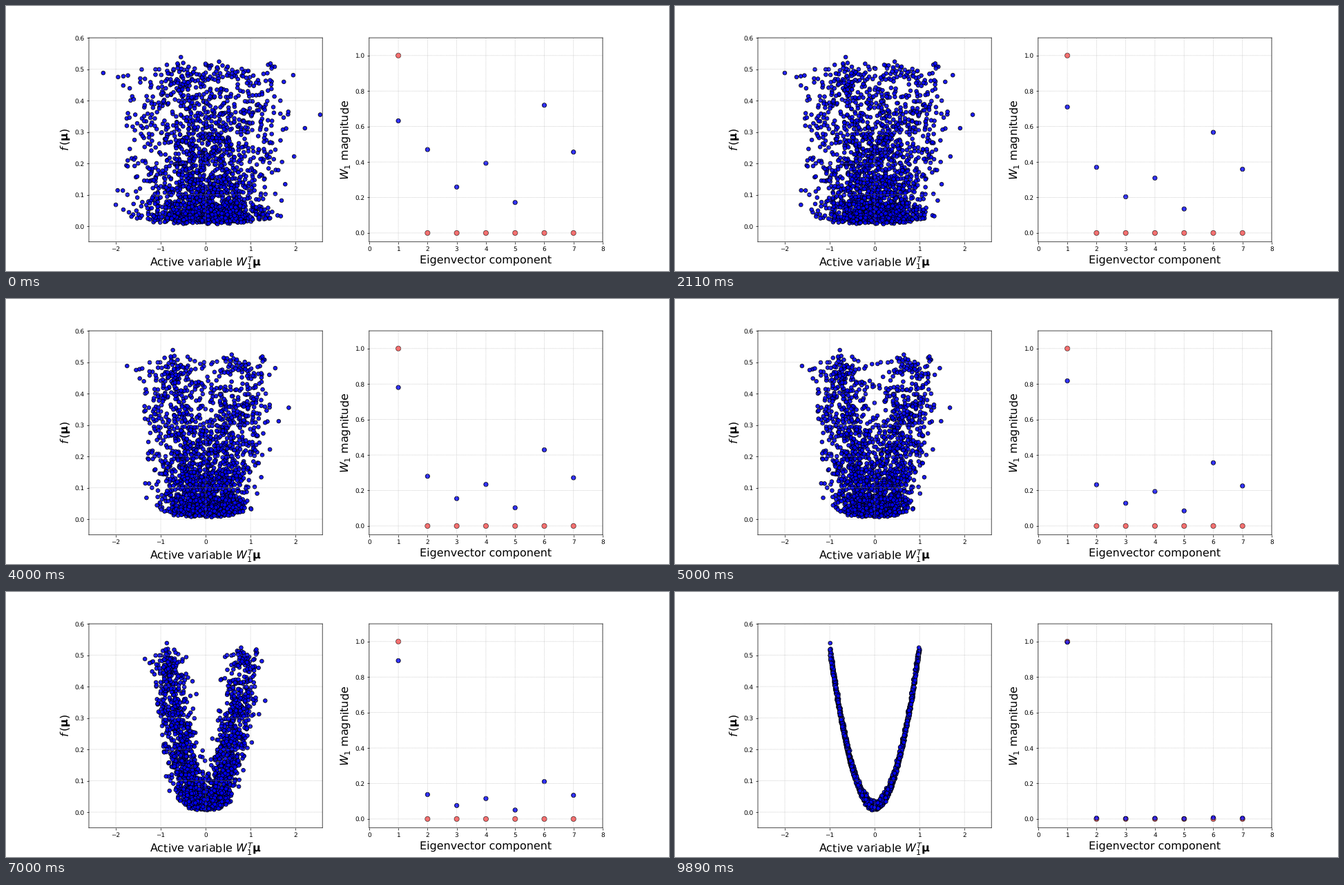
Write a matplotlib script that moves like this. It is 960 px wide and 384 px high and loops after 10 s.

```python
import numpy as np
import matplotlib.pyplot as plt
from matplotlib.animation import FuncAnimation

# Smooth subpixel lines and glyphs
plt.rcParams.update({'path.snap': False, 'text.hinting': 'none'})

FRAMES = 100
W_START = np.array([0.632, 0.470, 0.259, 0.393, 0.172, 0.720, 0.456])
W_END = np.eye(7)[0]

# Farthest samples: initial active variable and f
FAR_X = np.array([-2.28, -2.00, -1.96, -1.95, 1.95, 1.97, 2.21, 2.55])
FAR_F = np.array([0.488, 0.068, 0.114, 0.475, 0.481, 0.222, 0.312, 0.355])


def make_samples(n=2000, seed=7):
    """Return start x, end x and f for every sample."""
    mu = np.random.default_rng(seed).uniform(-1, 1, (n, 7))
    start, end = mu @ W_START, mu @ W_END
    f = 0.5 * end**2 + 0.01 * (mu[:, 1:]**2).sum(axis=1)
    keep = np.abs(start) < 1.85
    far_end = np.sign(FAR_X) * np.sqrt((FAR_F - 0.02) / 0.5)
    return (np.append(start[keep], FAR_X),
            np.append(end[keep], far_end),
            np.append(f[keep], FAR_F))


def setup(ax, xlim, ylim, xlabel, ylabel):
    ax.set(xlim=xlim, ylim=ylim)
    ax.set_xlabel(xlabel, fontsize=18)
    ax.set_ylabel(ylabel, fontsize=18)
    ax.grid(linestyle='dotted')


def dots(ax, x, y, color, size, alpha):
    # A list of edge colours avoids rounding markers to whole pixels
    return ax.scatter(x, y, c=color, s=size, alpha=alpha,
                      edgecolors=['k', 'k'])


def blend(a, b, s):
    return (1 - s) * a + s * b


start, end, f = make_samples()
comp = np.arange(1, 8)

fig, (left, right) = plt.subplots(1, 2, figsize=(15, 6), dpi=64)
setup(left, (-2.6, 2.6), (-0.05, 0.6),
      r'Active variable $W_1^T \mathbf{\mu}$', r'$f \, (\mathbf{\mu})$')
setup(right, (0, 8), (-0.05, 1.1),
      'Eigenvector component', r'$W_1$ magnitude')

cloud = dots(left, start, f, 'blue', 40, 0.9)
dots(right, comp, W_END, 'red', 66, 0.6)
weights = dots(right, comp, W_START, 'blue', 50, 0.85)


def update(i):
    s = i / (FRAMES - 1)
    cloud.set_offsets(np.column_stack([blend(start, end, s), f]))
    weights.set_offsets(np.column_stack([comp, blend(W_START, W_END, s)]))
    return cloud, weights


anim = FuncAnimation(fig, update, frames=FRAMES, interval=100,
                     repeat=True, repeat_delay=0)
plt.show()
```
